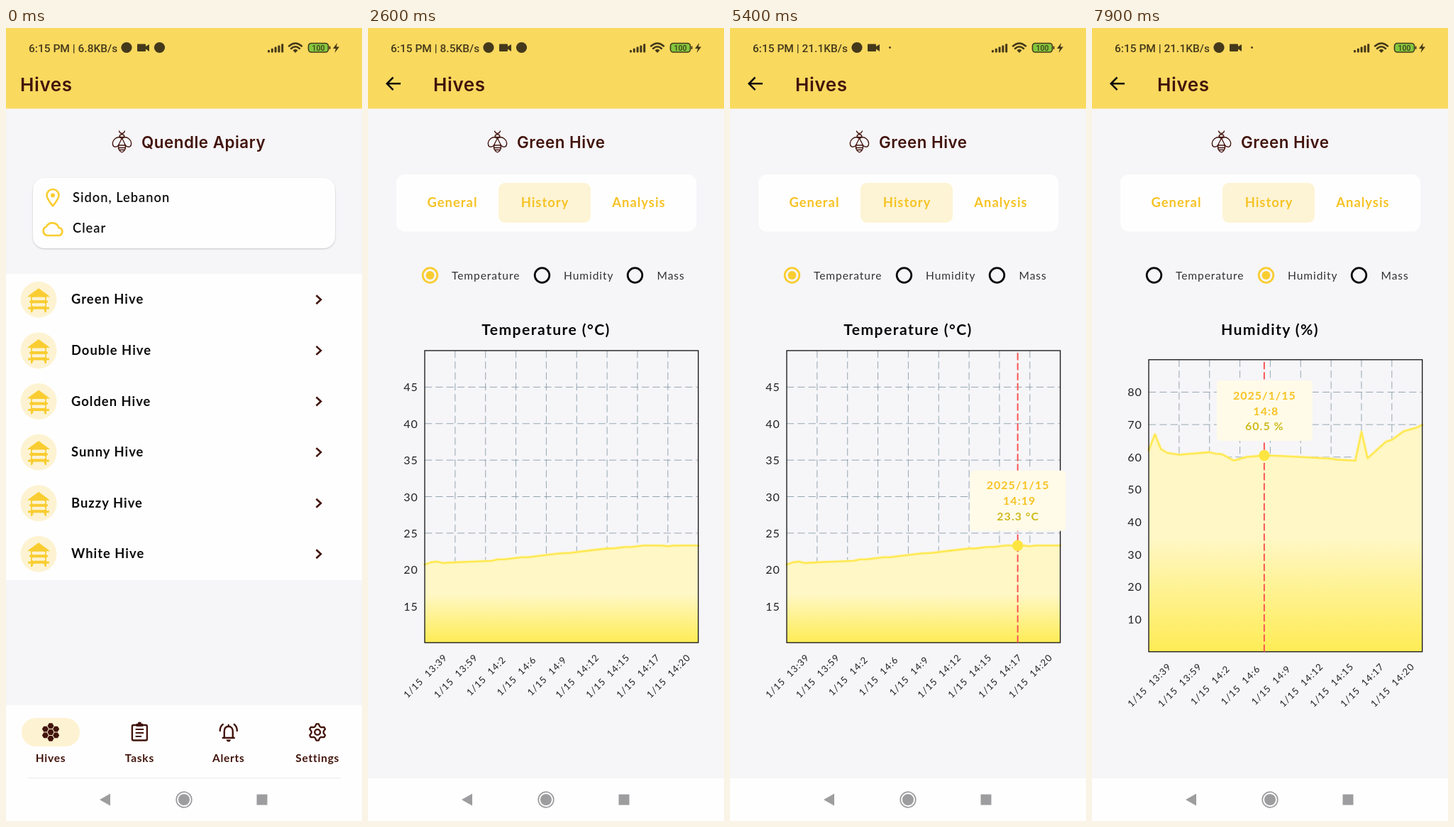
An HTML page for the animation above (8 s loop, 502 by 1116 pixels).

```html
<!DOCTYPE html>
<html lang="en">
<head>
<meta charset="utf-8">
<title>Hive monitor</title>
<style>
html, body { margin: 0; width: 100%; height: 100%; overflow: hidden; background: #f6f5f8 }
svg { display: block; width: 100%; height: 100% }
text { font-family: Lato, sans-serif; white-space: pre }
.status { font: 500 15.5px Roboto, sans-serif; fill: #44391b }
.head { font: 600 26px Inter, sans-serif; letter-spacing: .6px; fill: #42140c }
.sub { font: 600 22.4px Inter, sans-serif; letter-spacing: .5px; fill: #42140c }
.row { font-weight: 700; font-size: 18.4px; letter-spacing: 1px; fill: #0c0c0c }
.place { font-weight: 600; font-size: 18.3px; letter-spacing: 1px; fill: #111 }
.tab { font-weight: 700; font-size: 18.4px; letter-spacing: 1px; fill: #f6c326 }
.nav { font-weight: 700; font-size: 15.5px; letter-spacing: .75px; fill: #42140c }
.big { font-weight: 700; font-size: 21.2px; letter-spacing: 1.4px; fill: #080808 }
.muted { font-size: 15.5px; letter-spacing: .8px; fill: #b0b0b2 }
.radio { font-size: 15.6px; letter-spacing: .9px; fill: #333 }
.axis { font-size: 16px; letter-spacing: 1.1px; fill: #222 }
.tick { font-size: 13.2px; letter-spacing: 1px; fill: #222 }
.tip { font-weight: 700; font-size: 16px; letter-spacing: 1px; fill: #f8c325 }
.mid { text-anchor: middle }
.end { text-anchor: end }
.line { fill: none; stroke-linecap: round; stroke-linejoin: round }
.card { fill: #fffefe; filter: drop-shadow(0 1.5px 1px #0003) }
</style>
</head>
<body>
<svg id="stage" viewBox="0 0 502 1116" preserveAspectRatio="none"></svg>
<script>
const BROWN = '#42140c', YELLOW = '#f9cd31', CREAM = '#fdf3d2', PAPER = '#f6f5f8', WHITE = '#fffefe';
const LOOP = 8000;
const byId = id => document.getElementById(id);
const range = (n, f) => Array.from({ length: n }, (_, i) => f(i)).join('');

// SVG helpers
const text = (x, y, s, cls, extra = '') => `<text x="${x}" y="${y}" class="${cls}" ${extra}>${s}</text>`;
const rect = (x, y, w, h, fill, r = 0, extra = '') =>
  `<rect x="${x}" y="${y}" width="${w}" height="${h}" rx="${r}" fill="${fill}" ${extra}/>`;
const circle = (x, y, r, fill, extra = '') => `<circle cx="${x}" cy="${y}" r="${r}" fill="${fill}" ${extra}/>`;
const ring = (x, y, r, color, w) => circle(x, y, r, 'none', `stroke="${color}" stroke-width="${w}"`);
const shape = (d, fill) => `<path d="${d}" fill="${fill}"/>`;
const line = (d, color, w, extra = '') => `<path class="line" d="${d}" stroke="${color}" stroke-width="${w}" ${extra}/>`;
const at = (x, y, body) => `<g transform="translate(${x} ${y})">${body}</g>`;
const group = (id, body, extra = '') => `<g id="${id}" ${extra}>${body}</g>`;
const card = (x, y, w, h, r = 13) => `<rect class="card" x="${x}" y="${y}" width="${w}" height="${h}" rx="${r}"/>`;
const polygon = (x, y, n, radius, turn = 0) => 'M' + Array.from({ length: n }, (_, i) => {
  const a = (i / n) * 2 * Math.PI + turn;
  return `${(x + radius(i) * Math.cos(a)).toFixed(2)} ${(y + radius(i) * Math.sin(a)).toFixed(2)}`;
}).join('L') + 'Z';
const hexagon = (x, y, r, turn = 0) => polygon(x, y, 6, () => r, turn);

// Icons, each centred on 0,0
const icon = {
  bee: line('M-4-15Q-3-12 0-11.5Q3-12 4-15M-3.5-7.5A3.6 3.6 0 0 1 3.5-7.5Q0-5-3.5-7.5' +
    'M-1-5C-7-9-14-2-13 4C-12 9-6 8-4 3L0-5M1-5C7-9 14-2 13 4C12 9 6 8 4 3L0-5' +
    'M-4 4C-7 9-3 14 0 15C3 14 7 9 4 4M-3.5 5H3.5M-5 8.5H5M-4 11.5H4', BROWN, 1.3),
  hive: circle(0, 0, 25.5, CREAM) + shape('M0-16L11-8L16-4H-16L-11-8Z', YELLOW) +
    rect(-11, -5, 22, 18, YELLOW) + rect(-9.5, -3.5, 19, 4.5, CREAM, 2) + rect(-9.5, 5, 19, 4.5, CREAM, 2) +
    rect(-13, 1.5, 26, 3, YELLOW, 1) + rect(-15, 10.5, 30, 3, YELLOW, 1) +
    shape('M-11 13H-7L-9 18H-11ZM11 13H7L9 18H11Z', YELLOW),
  pin: line('M0 11.5C-5 5-8.5 1-8.5-3.5A8.5 8.5 0 0 1 8.5-3.5C8.5 1 5 5 0 11.5Z', YELLOW, 2.6) + circle(0, -3.5, 3, YELLOW),
  cloud: line('M-8 9A6.5 6.5 0 0 1-9-3.5A9.5 9.5 0 0 1 8.5-2A5.6 5.6 0 0 1 9 9Z', YELLOW, 2.7),
  comb: shape(hexagon(0, 0, 4.5) + [0, 1, 2, 3, 4, 5].map(i => {
    const a = (i + .5) * Math.PI / 3;
    return hexagon(8.8 * Math.cos(a), 8.8 * Math.sin(a), 4.5);
  }).join(''), BROWN),
  tasks: rect(-10.5, -10, 21, 21.5, 'none', 2, `stroke="${BROWN}" stroke-width="2.4"`) +
    rect(-5, -12, 10, 4, BROWN, 1) + circle(0, -12, 2.6, BROWN) + line('M-5-4H5M-5 1H5M-5 6H2', BROWN, 2),
  bell: line('M-8 8H8M-6 8V-1C-6-5-4-8 0-8S6-5 6-1V8M0-8V-10M-12-2Q-12-8-8-11M12-2Q12-8 8-11', BROWN, 2.4) +
    shape('M-3 10.5H3A3 3 0 0 1-3 10.5Z', BROWN),
  gear: line(polygon(0, 0, 24, i => i % 4 < 2 ? 11.8 : 8.6, Math.PI / 8), BROWN, 2.3) + ring(0, 0, 3.9, BROWN, 2.4),
  heat: circle(0, 0, 25.5, '#faeaf4') +
    line('M4-10A4 4 0 0 1 12-10V3A6.5 6.5 0 1 1 4 3ZM8-5V7', '#f75fa9', 2.2) +
    line('M-1-6A6 6 0 0 0-1 6M-13 0H-11M-10-9L-8.5-7.5M-3-13V-11M-10 9L-8.5 7.5M-3 13V11', '#f75fa9', 2.2),
  drops: circle(0, 0, 25.5, '#e0eff0') +
    line('M-7-7C-14 1-12 6-7 6S0 1-7-7ZM3-12C7-5 12-1 12 4A9 9 0 0 1-4 9M3-12C2-9 0-7-1-6', '#52aaea', 2.5),
  mass: circle(0, 0, 26, '#d9f0ea') + ring(0, -9.5, 3.8, '#63ac89', 2.5) +
    line('M-8-5H8L13 9Q13 11.5 10 11.5H-10Q-13 11.5-13 9Z', '#63ac89', 2.6),
  frames: circle(0, 0, 25.5, '#eec8c2') + line('M-14.5-14H14.5V14H-14.5ZM-14-9H14', '#cd6b60', 1.3) +
    line([0, 1, 2, 3].map(r => [0, 1, 2, 3].map(c =>
      hexagon(-10.8 + c * 6.2 + (r % 2) * 3, -4.5 + r * 5.2, 3.3, Math.PI / 6)).join('')).join(''), '#cd6b60', 1),
  bug: circle(0, 0, 25.5, '#b2b1b2') +
    line('M-7-3Q-7-8 0-8T7-3V5Q7 12 0 12T-7 5ZM-5-8Q-4-12 0-12T5-8M0-2V11M-4-11L-7-14M4-11L7-14M-7 1H-13M7 1H13' +
      'M-7-4L-11-6V-9M7-4L11-6V-9M-7 6L-11 8V12M7 6L11 8V12', '#0b0b0b', 2.6)
};

const header = (title, x) => rect(0, 0, 502, 113.5, '#fad95f') + text(x, 88.5, title, 'head');
const systemBar = rect(0, 1056, 502, 60, WHITE);

const homePage = () => {
  const names = ['Green', 'Double', 'Golden', 'Sunny', 'Buzzy', 'White'];
  const tabs = [['Hives', 'comb'], ['Tasks', 'tasks'], ['Alerts', 'bell'], ['Settings', 'gear']];
  return rect(0, 0, 502, 1116, PAPER) + header('Hives', 20) +
    at(163.5, 160, icon.bee) + text(191, 169, 'Quendle Apiary', 'sub') +
    card(38, 211, 426, 99, 16) + at(66, 239, icon.pin) + at(66, 283, icon.cloud) +
    text(94, 245, 'Sidon, Lebanon', 'place') + text(94, 288, 'Clear', 'place') +
    rect(0, 346, 502, 431, WHITE) + rect(0, 346, 502, 72, '#000', 0, 'id="press" opacity="0"') +
    names.map((name, i) => at(0, 382.3 + i * 71.6, at(46, 0, icon.hive) + text(92, 6, name + ' Hive', 'row') +
      line('M437.5-6L444 0L437.5 6', BROWN, 2.6, 'style="stroke-linecap:butt;stroke-linejoin:miter"'))).join('') +
    rect(0, 953, 502, 163, WHITE) + rect(22, 971, 82, 40, CREAM, 20) +
    tabs.map(([label, name], i) => at(63 + i * 125.4, 991, icon[name] + text(0, 42, label, 'nav mid'))).join('') +
    rect(31, 1055, 441, 1, '#ececee');
};

const generalPanel = () => {
  const stat = (x, y, name, value, label) => card(x, y, 210, 136) + at(x + 42, y + 38.5, icon[name]) +
    text(x + 194, y + 46, value, 'big end') + text(x + 17, y + 118, label, 'muted');
  return rect(312, 225, 1, 43, '#d2d0d0') +
    stat(31, 323, 'heat', '23.3°C', 'Temperature') + stat(262, 323, 'drops', '69.9%', 'Humidity') +
    stat(31, 480, 'mass', '20.63 kg', 'Mass') + stat(262, 480, 'frames', '12', 'Number of Frames') +
    card(35, 642, 432, 89) + text(53, 670, 'Inspected on', 'muted') + text(53, 711, 'Jan 15, 2025', 'big') +
    card(31, 757, 441, 130) + at(73, 795.5, icon.bug) + text(456, 803, 'Diseases', 'big end') +
    text(48, 869, 'No diseases', 'muted');
};

// Piecewise linear lookup through [position, value] pairs
const interpolate = (keys, p) => {
  const i = Math.max(1, keys.findIndex(k => k[0] >= p));
  const [[a, u], [b, v]] = [keys[i - 1], keys[i]];
  return u + (v - u) * (p - a) / (b - a);
};
const STEP = 385.7 / 45;
const pointX = i => 80 + i * STEP;
const minutes = [[0, 819], [5, 839], [10, 842], [15, 846], [20, 849], [25, 852], [30, 855], [35, 857], [40, 860], [45, 863]];
const clock = i => {
  const m = Math.round(interpolate(minutes, i));
  return `${Math.floor(m / 60)}:${m % 60}`;
};

const charts = {
  temperature: {
    title: 'Temperature (°C)', unit: '°C', top: 454, min: 10, max: 50, labels: [15, 20, 25, 30, 35, 40, 45],
    keys: [[0, 20.7], [1, 21], [2, 21.1], [3, 20.9], [5, 21], [8, 21.1], [11, 21.2], [12, 21.4], [13, 21.4], [16, 21.7],
      [17, 21.7], [22, 22.2], [24, 22.3], [27, 22.6], [30, 22.9], [31, 22.9], [33, 23.1], [34, 23.1], [36, 23.3],
      [39, 23.3], [40, 23.2], [41, 23.3], [45, 23.3]]
  },
  humidity: {
    title: 'Humidity (%)', unit: '%', top: 466.8, min: 0, max: 90, labels: [10, 20, 30, 40, 50, 60, 70, 80],
    keys: [[0, 62], [1, 67], [2, 62.5], [3, 61.3], [5, 60.7], [10, 61.5], [11, 61], [12, 60.9], [14, 58.9], [16, 60],
      [19, 60.5], [22, 60.3], [30, 59.5], [31, 59.2], [34, 58.9], [35, 67.8], [36, 59.6], [39, 64.7], [40, 65.3],
      [42, 68], [44, 69], [45, 69.9]]
  }
};
const valueY = (c, v) => c.top + 411 * (c.max - v) / (c.max - c.min);

const chart = name => {
  const c = charts[name], bottom = c.top + 411;
  const curve = 'M' + c.keys.map(([i, v]) => `${pointX(i).toFixed(1)} ${valueY(c, v).toFixed(1)}`).join('L');
  const dash = 'stroke-dasharray="10.2 5.1" style="stroke-linecap:butt"';
  return text(251, 432, c.title, 'big mid') +
    line(range(8, i => `M${pointX(5 * i + 5)} ${c.top}V${bottom}`) +
      c.labels.map(v => `M80 ${valueY(c, v)}H466`).join(''), '#607d8b', .65, dash) +
    shape(`${curve}V${bottom}H80Z`, 'url(#honey)') +
    line(curve, '#fff3a6', 5, 'opacity=".5"') + line(curve, '#ffe84e', 2.3) +
    rect(80, c.top, 385.7, 411, 'none', 0, 'stroke="#111" stroke-width="1.3"') +
    c.labels.map(v => text(71, valueY(c, v) + 6, v, 'axis end')).join('') +
    range(9, i => `<g transform="translate(${pointX(5 * i) + 1} ${bottom + 47}) rotate(-45)">` +
      text(0, 4.5, '1/15\u00a0 ' + clock(5 * i), 'tick mid') + '</g>');
};

const radio = (id, x, textX, label) =>
  group(id + 'Off', ring(x, 348, 10.3, '#0b0b0b', 2.8)) +
  group(id + 'On', ring(x, 348, 10.3, YELLOW, 2.8) + circle(x, 348, 6, YELLOW)) +
  text(textX, 354, label, 'radio');

const tooltip = group('tooltip',
  `<path id="cursor" stroke="#f95656" stroke-width="2" stroke-dasharray="10.2 4"/>` +
  group('marker', circle(0, 0, 7.7, '#fde541') + rect(-67, -105.5, 135, 85, '#fffbe8', 5) +
    text(.5, -79, '2025/1/15', 'tip mid') + text(2.5, -57, '', 'tip mid', 'id="tipTime"') +
    text(.5, -35.5, '', 'tip mid', 'id="tipValue" style="fill:#cfba20"')));

const historyPanel = () => radio('temperature', 87.5, 118, 'Temperature') + radio('humidity', 245.5, 276, 'Humidity') +
  radio('mass', 376.5, 407.5, 'Mass') +
  group('temperatureChart', chart('temperature')) + group('humidityChart', chart('humidity')) + tooltip;

const hivePage = () => rect(0, 0, 502, 1116, PAPER) + header('Hives', 92) +
  line('M46 78.3H28M35.5 69.5L26.7 78.3L35.5 87.1', '#0b0b0b', 2.5, 'style="stroke-linecap:butt;stroke-linejoin:miter"') +
  at(182.5, 160, icon.bee) + text(210, 169, 'Green Hive', 'sub') +
  rect(40, 206, 423, 80.5, WHITE, 12) + rect(51, 218, 135, 56, '#fdf4d5', 9, 'id="highlight"') +
  ['General', 'History', 'Analysis'].map((s, i) => text([119, 249.5, 382][i], 252, s, 'tab mid')).join('') +
  group('general', generalPanel()) + group('history', historyPanel()) + systemBar;

const INK = '#44391b';
const statusBar = () => text(32, 33.5, '', 'status', 'id="speed"') +
  group('badges', circle(170, 27.5, 7.6, INK) + rect(185, 22.5, 12, 10.5, INK, 1) + shape('M197 26L202 23V33L197 29.5Z', INK) +
    group('secondBadge', circle(216.5, 27.5, 7.6, INK)) + group('moreDot', circle(216.5, 27.5, 1.4, INK))) +
  range(5, i => rect(369 + i * 4.8, 31 - i * 2.2, 3, 3.5 + i * 2.2, INK, 1)) +
  line('M399 25.5Q408 17.5 417 25.5M402 29Q408 23.5 414 29', INK, 2.5) + shape('M404.5 31.5Q408 28 411.5 31.5L408 35Z', INK) +
  rect(426.5, 21.5, 28, 12.5, '#83c83d', 4, `stroke="${INK}" stroke-width="1.6"`) + rect(455.5, 25.5, 2, 4.5, INK, 1) +
  text(440.5, 31.7, '100', 'status mid', 'style="font-size:10.5px"') + shape('M467 21L461 29H465L463.5 35L470 26.5H466Z', INK);

const systemButtons = shape('M147 1077.5V1094.5L132 1086Z', '#9d9d9f') + ring(251, 1086, 10.8, '#9d9d9f', 1.7) +
  circle(251, 1086, 8, '#9d9d9f') + rect(353.5, 1078.5, 15, 15, '#9d9d9f');

byId('stage').innerHTML = `<defs><linearGradient id="honey" x1="0" y1="0" x2="0" y2="1">
  <stop offset=".5" stop-color="#fff7c5"/><stop offset="1" stop-color="#feec55"/></linearGradient></defs>` +
  group('home', homePage()) + group('hive', hivePage()) + group('statusBar', statusBar()) + systemButtons;

const show = (id, on) => byId(id).setAttribute('display', on ? 'inline' : 'none');
const set = (id, attrs) => Object.entries(attrs).forEach(([k, v]) => byId(id).setAttribute(k, v));
const progress = (t, start, length) => Math.min(1, Math.max(0, (t - start) / length));
const easeOut = p => 1 - (1 - p) ** 3;

// Finger drags: [time, data index]
const drags = [
  [[3300, 1], [4100, 8], [4900, 22], [5500, 41], [5700, 41], [6200, 2]],
  [[7300, 5], [7900, 19], [8000, 21]]
];

function render(t) {
  const humid = t >= 6800, name = humid ? 'humidity' : 'temperature';

  const open = progress(t, 400, 300), scale = .88 + .12 * easeOut(open);
  set('press', { opacity: .09 * progress(t, 80, 120) });
  show('hive', open > 0);
  set('hive', {
    opacity: Math.min(1, open * 2),
    transform: `translate(251 558) scale(${scale}) translate(-251 -558)`
  });

  const slide = easeOut(progress(t, 2100, 200)), onHistory = t >= 2200;
  set('highlight', { x: 51 + 133 * slide, width: 135 - 5 * slide });
  show('general', !onHistory);
  show('history', onHistory);

  for (const id of ['temperature', 'humidity', 'mass']) {
    show(id + 'On', id === name);
    show(id + 'Off', id !== name);
  }
  show('temperatureChart', !humid);
  show('humidityChart', humid);

  const drag = drags.find(d => t >= d[0][0] && t <= d[d.length - 1][0]);
  show('tooltip', drag);
  if (drag) {
    const c = charts[name], i = Math.round(interpolate(drag, t)), v = interpolate(c.keys, i);
    set('cursor', { d: `M${pointX(i)} ${c.top + 411}V${c.top}` });
    set('marker', { transform: `translate(${pointX(i)} ${valueY(c, v)})` });
    byId('tipTime').textContent = clock(i);
    byId('tipValue').textContent = `${v.toFixed(1)} ${c.unit}`;
  }

  const speed = t < 500 ? '6.8' : t < 3300 ? '8.5' : '21.1';
  byId('speed').textContent = `6:15 PM | ${speed}KB/s`;
  set('badges', { transform: `translate(${t < 3300 ? 0 : 9} 0)` });
  show('secondBadge', t < 4400);
  show('moreDot', t >= 4400);
}

function frame() {
  render(performance.now() % LOOP);
  requestAnimationFrame(frame);
}
frame();
</script>
</body>
</html>
```
